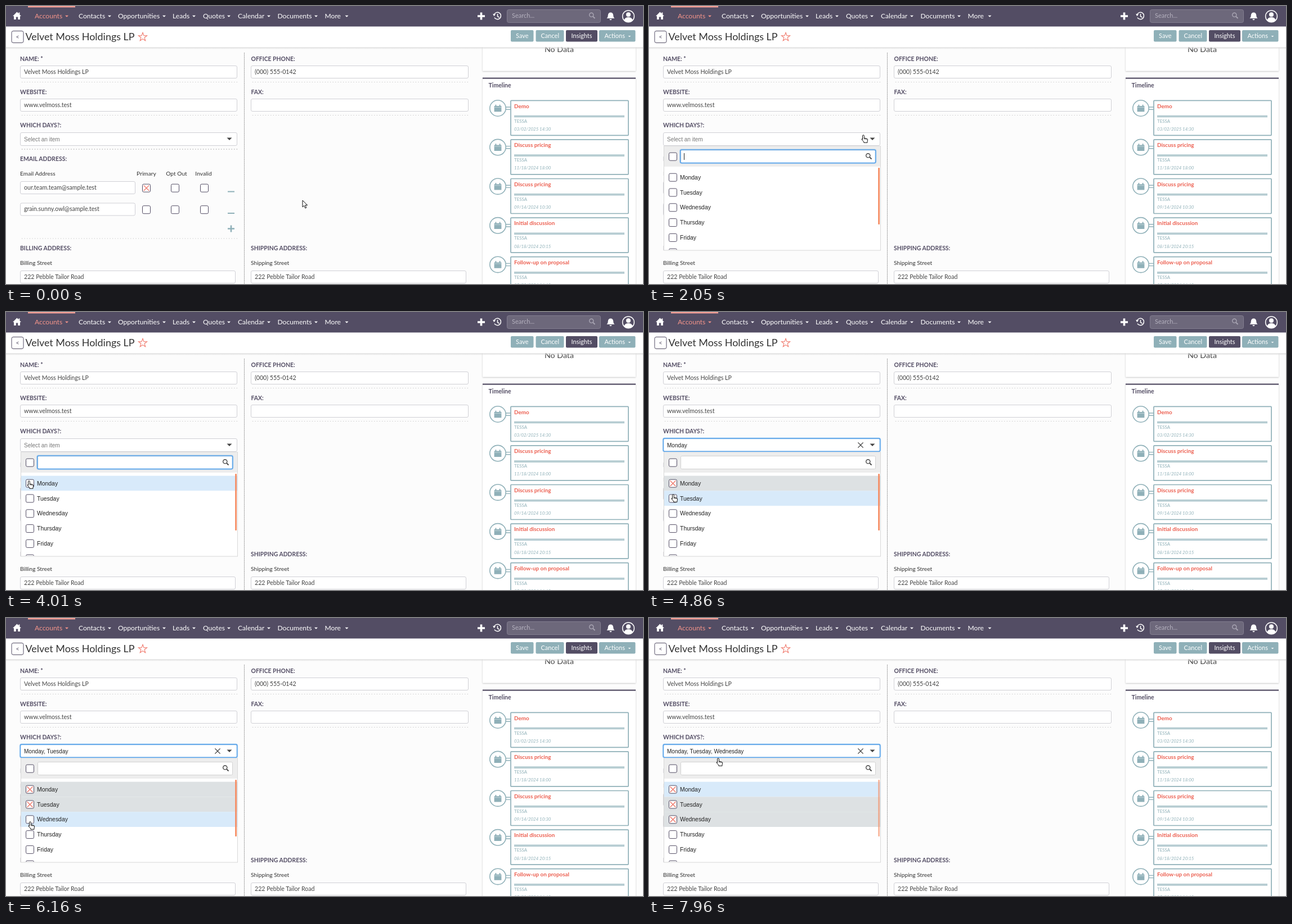
Animation of 1132 by 495 pixels, one loop 7990 ms. Source, as an HTML page:

```html
<!DOCTYPE html>
<html lang="en">
<head>
<meta charset="utf-8">
<title>Account form</title>
<style>
  html, body { margin: 0; width: 100%; height: 100%; overflow: hidden; background: #fcfcfc; }
  svg { display: block; width: 100%; height: 100%; }
  text { font-family: Lato, "Open Sans", sans-serif; white-space: pre; }
  .ui { font-family: "Liberation Sans", Arial, sans-serif; }
</style>
</head>
<body>
<svg id="stage" viewBox="0 0 1132 495" xmlns="http://www.w3.org/2000/svg"></svg>
<script>
const LOOP = 7990;
const PLUM = '#534d64', TEAL = '#8fb0b8', CORAL = '#f0796c', INK = '#444', BLUE = '#4f9fea', EDGE = '#d0d0d5';
const DAYS = ['Monday', 'Tuesday', 'Wednesday', 'Thursday', 'Friday', 'Saturday'];
const ROW_TOP = 291.6, ROW_H = 26.8;

// Markup helpers
const attrs = o => Object.entries(o).map(([k, v]) => ` ${k}="${v}"`).join('');
const text = (x, y, s, size, fill = INK, more = {}) =>
  `<text${attrs({ x, y, 'font-size': size, fill, ...more })}>${s}</text>`;
const rect = (x, y, width, height, fill, more = {}) =>
  `<rect${attrs({ x, y, width, height, fill, ...more })}/>`;
const path = (d, stroke, width = 1, more = {}) =>
  `<path${attrs({ d, fill: 'none', stroke, 'stroke-width': width, ...more })}/>`;
const shape = (d, fill, more = {}) => `<path${attrs({ d, fill, ...more })}/>`;
const circle = (cx, cy, r, fill, more = {}) => `<circle${attrs({ cx, cy, r, fill, ...more })}/>`;
const group = (id, body, more = {}) => `<g${attrs({ id, ...more })}>${body}</g>`;

const BOLD = { 'font-weight': 700 }, MIDDLE = { 'text-anchor': 'middle' };
const label = (x, y, s) => text(x, y, s, 10.4, PLUM, BOLD);
const field = (x, y, w, s = '') =>
  rect(x + .5, y + .5, w - 1, 22, '#fff', { rx: 2.5, stroke: EDGE }) + text(x + 7, y + 14.5, s, 10.6);
const dots = (x, y, color = '#c0c0c0') =>
  path(`M${x} ${y}h384`, color, 1.1, { 'stroke-dasharray': '1.2 3.4' });
const caretDown = (x, y, w, fill) => shape(`M${x - w / 2} ${y}h${w}l${-w / 2} ${w / 2}z`, fill);
const cross = (x, y, r, color, width) =>
  path(`M${x - r} ${y - r}l${2 * r} ${2 * r}m0 ${-2 * r}l${-2 * r} ${2 * r}`, color, width);
const checkbox = (x, y) => rect(x - 6.5, y - 6.8, 14, 14, '#fff', { rx: 2.2, stroke: PLUM });
const focusRing = (x, y, w, h) =>
  rect(x, y, w, h, 'none', { rx: 2.5, stroke: BLUE, 'stroke-opacity': .28, 'stroke-width': 3.2 }) +
  rect(x, y, w, h, 'none', { rx: 2.5, stroke: BLUE, 'stroke-width': 1.3 });
const magnifier = (x, y, color) =>
  circle(x - 1.2, y - 1.2, 3.6, 'none', { stroke: color, 'stroke-width': 1.4 }) +
  path(`M${x + 1.6} ${y + 1.6}l3.4 3.4`, color, 1.9);

function navBar() {
  const items = [['Accounts', 51, 108], ['Contacts', 129, 184], ['Opportunities', 199, 281], ['Leads', 296, 334],
    ['Quotes', 350, 396], ['Calendar', 412, 467], ['Documents', 482.5, 551], ['More', 566.5, 605.5]];
  return rect(0, 0, 1132, 36.5, PLUM) + rect(39, 0, 84, 2.5, '#f4a198') +
    shape('M12 18l7.5-7.5 2.9 2.9v-2h2v4L27 18h-2v6h-3.8v-4.5h-3.4V24H14v-6z', '#fff') +
    items.map(([name, x, arrow], i) => {
      const color = i ? '#fff' : '#f4948a';
      return text(x, 21.6, name, 12.1, color) + caretDown(arrow, 16.8, 6, color);
    }).join('') +
    path('M838 18h13M844.5 11.5v13', '#fff', 3.6) +
    path('M867.4 15.5a6.2 6.2 0 1 1 .6 5.2M873.5 14v4.5l3 1.8', '#fff', 1.5) +
    shape('M865.2 14l5 .6-3 3.6z', '#fff') +
    rect(890.5, 6.5, 166, 23, '#6d687b', { rx: 3, stroke: '#837e90' }) +
    text(899, 21, 'Search...', 11, '#b4b0be') + magnifier(1041.5, 17, '#aaa6b4') +
    shape('M1067.5 22q2.4-2 2.4-6a4.6 4.6 0 0 1 9.2 0q0 4 2.4 6zM1072.5 23.2h4a2 2 0 0 1-4 0z', '#fff') +
    circle(1106, 18.3, 10.4, 'none', { stroke: '#fff', 'stroke-width': 1.5 }) +
    circle(1106, 15.2, 4, '#fff') + shape('M1098.5 25q1.5-5 7.5-5t7.5 5q-3 3-7.5 3t-7.5-3z', '#fff');
}

function titleBar() {
  const star = Array.from({ length: 10 }, (_, i) => {
    const r = i % 2 ? 3.3 : 8, a = i * Math.PI / 5;
    return `${243 + r * Math.sin(a)},${55.3 - r * Math.cos(a)}`;
  }).join(' ');
  const button = (x, w, s, tx, fill = TEAL) =>
    rect(x, 43, w, 20.5, fill, { rx: 2 }) + text(tx, 57, s, 11, '#fff');
  return rect(0, 36.5, 1132, 37, '#fff') + rect(0, 73.5, 1132, 3.5, 'url(#drop)') +
    rect(10, 44.5, 21, 21, '#fff', { rx: 3, stroke: PLUM }) + text(20.5, 58.5, '&lt;', 10.5, PLUM, MIDDLE) +
    text(34.5, 60.5, 'Velvet Moss Holdings LP', 17.9, '#333') +
    `<polygon points="${star}" fill="#fff" stroke="${CORAL}" stroke-width="1.1"/>` +
    button(897, 40.5, 'Save', 906) + button(941.5, 50, 'Cancel', 950.5) +
    button(995, 56, 'Insights', 1004.5, PLUM) + button(1054, 64.5, 'Actions', 1063.5) +
    caretDown(1108, 53, 4.5, '#fff');
}

function form() {
  const emailRow = (y, address) => field(25, y, 205, address) +
    [249, 300, 352].map(x => checkbox(x, y + 12)).join('') + path(`M394 ${y + 18.5}h12`, TEAL, 2);
  const address = (x, kind) => label(x, 435.4, `${kind.toUpperCase()} ADDRESS:`) +
    text(x, 461, `${kind} Street`, 10.25, '#333') + field(x, 471, 383, '222 Pebble Tailor Road');
  return label(25, 97.5, 'NAME: *') + field(25, 106, 386, 'Velvet Moss Holdings LP') +
    label(435.5, 97.5, 'OFFICE PHONE:') + field(435, 106, 387, '(000) 555-0142') +
    label(25, 156.5, 'WEBSITE:') + field(25, 165, 386, 'www.velmoss.test') +
    label(435.5, 156.5, 'FAX:') + field(435, 165, 387) +
    label(25, 215.8, 'WHICH DAYS?:') +
    [[28, 135.5], [438, 135.5], [28, 194.5], [438, 194.5], [28, 414]].map(p => dots(...p)).join('') +
    dots(28, 255, '#858585') +
    path('M423.5 83V495', '#9c9c9c', 1, { 'stroke-dasharray': '2 .7' }) +
    label(25, 276, 'EMAIL ADDRESS:') + text(25, 301.5, 'Email Address', 10.25, '#333') +
    [['Primary', 249.5], ['Opt Out', 303], ['Invalid', 351]]
      .map(([s, x]) => text(x, 301.5, s, 10.25, '#333', MIDDLE)).join('') +
    emailRow(312, 'our.team.team@sample.test') + emailRow(350.5, 'grain.sunny.owl@sample.test') +
    cross(249.5, 324.2, 4.8, CORAL, 1.3) + path('M394 396.5h12m-6-6v12', TEAL, 2.6) +
    address(25, 'Billing') + address(435, 'Shipping');
}

function sidebar() {
  const events = [['Demo', '03/02/2025 14:30'], ['Discuss pricing', '11/18/2024 18:00'],
    ['Discuss pricing', '09/14/2024 10:30'], ['Initial discussion', '08/18/2024 20:15'],
    ['Follow-up on proposal', '07/22/2024 16:45']];
  const event = ([name, date], i) => `<g transform="translate(0 ${i * 69.6})">` +
    circle(874, 182, 14.2, '#fff', { stroke: TEAL, 'stroke-width': 1.6 }) +
    path('M888 180h9m-9 4.2h9', TEAL, 1.4) +
    shape('M867.6 178h1.8v-2.3h2v2.3h5.2v-2.3h2v2.3h1.8v10.3h-12.8z', TEAL) +
    path('M867.6 180.5h12.8', '#d5e2e5', .7) +
    rect(897, 168.3, 209, 62, '#fff', { rx: 1, stroke: TEAL, 'stroke-width': 1.7 }) +
    text(903, 181.6, name, 9.9, '#ec5f50', BOLD) +
    rect(903, 195, 196, 3, '#bed1d6') + path('M903 195.2h196m-196 2.6h196', '#9dbcc3', .7) +
    text(903, 207.6, 'TESSA', 7.9, TEAL) +
    text(903, 221.8, date, 7.9, TEAL, { 'font-style': 'italic' }) + '</g>';
  const card = { filter: 'url(#soft)' };
  return rect(847, 60, 272, 55.5, '#fff', card) + text(983, 82, 'No Data', 14.2, INK, MIDDLE) +
    rect(847, 127.5, 272, 400, '#fff', card) + rect(847, 127.5, 272, 2.2, PLUM) +
    text(857.5, 145.3, 'Timeline', 10.5, PLUM, BOLD) + events.map(event).join('');
}

function select() {
  return rect(25.5, 225.5, 385, 23, '#fff', { rx: 2.5, stroke: EDGE }) +
    group('ring', focusRing(25.3, 225, 385.5, 23.3) + cross(376, 237, 4.6, '#333', 1.2)) +
    caretDown(397, 234.6, 9, INK) + text(32, 240.7, '', 10.05, '#777', { id: 'value', class: 'ui' });
}

function dropdown() {
  const option = (name, i) => {
    const y = ROW_TOP + (i + .5) * ROW_H;
    return rect(27, y - ROW_H / 2, 384, ROW_H, '#fff', { id: 'row' + i }) + checkbox(42, y) +
      group('tick' + i, cross(42.5, y + .2, 5, CORAL, 1.4)) + text(55, y + 3.8, name, 10.45, '#222', { class: 'ui' });
  };
  return group('menu',
    rect(26.5, 249.5, 385, 185.5, '#fff', { stroke: '#d8d8d8' }) + rect(27, 249.5, 384, 36.5, '#ededed') +
    checkbox(42, 268) + rect(56.5, 256.5, 346, 23, '#fff', { rx: 2, stroke: '#d2d2d2' }) +
    group('searchRing', focusRing(55.6, 255.8, 347.2, 23.8)) +
    magnifier(390.5, 267.5, '#444') + rect(62, 262, 1, 12, '#222', { id: 'caret' }) +
    `<g clip-path="url(#list)">${DAYS.map(option).join('')}</g>` +
    rect(407.2, 288, 2.8, 101, '#f68d63', { id: 'bar', rx: 1 }));
}

const OUTLINE = { stroke: '#111', 'stroke-width': 1, 'stroke-linejoin': 'round' };
const stage = document.getElementById('stage');
stage.innerHTML = `<defs>
  <linearGradient id="drop" x2="0" y2="1"><stop stop-color="#dadada"/><stop offset="1" stop-color="#dadada" stop-opacity="0"/></linearGradient>
  <filter id="soft" x="-5%" y="-5%" width="110%" height="115%"><feDropShadow dx="0" dy="1" stdDeviation="1.3" flood-opacity=".25"/></filter>
  <clipPath id="list"><rect x="27" y="286" width="384" height="148"/></clipPath></defs>` +
  rect(0, 0, 1132, 495, '#fcfcfc') + form() + sidebar() + titleBar() + navBar() + select() + dropdown() +
  group('pointer',
    shape('M0 0v12l2.8-2.6 2 4.6 2-.9-2-4.4h3.8z', '#fff', { id: 'arrow', ...OUTLINE }) +
    group('hand',
      shape('M-1.5 7.5V1.2a1.4 1.4 0 0 1 2.8 0V5.2l5 1.1q1.4.4 1.3 1.8l-.6 3.4v1.8h-6.2v-1.4l-3.6-4q-.6-1.2.6-1.4z',
        '#fff', OUTLINE) + path('M1.4 5v2.6m2.1-2.1v2.2m2.1-1.7v2', '#111', .8)));

const el = {};
stage.querySelectorAll('[id]').forEach(node => { el[node.id] = node; });

// Tracks: [time, ...values]
const POINTER = [[530, 527, 346], [760, 508, 314], [930, 470, 287], [1090, 425, 264], [1280, 374, 228],
  [1570, 374, 228], [2050, 381, 230], [2510, 381, 230], [2640, 310, 207], [2800, 190, 195], [2930, 100, 200],
  [3030, 28, 220], [3110, 4, 248], [3210, 16, 286], [3290, 17, 287], [3420, 17, 287], [3600, 30, 297],
  [3850, 41, 301], [4620, 41, 301], [4860, 43, 325], [5020, 43, 332], [5500, 43, 332], [5910, 43, 362],
  [6160, 43, 363], [6600, 43, 363], [6700, 46, 318], [6810, 50, 274], [7000, 46, 266], [7350, 41, 264],
  [7520, 41, 264], [7760, 80, 260], [7960, 123, 250]];
const MENU = [[1570, 0], [1750, 1]];
const BAR = [[2600, 1], [2900, 0], [3540, 0], [3740, 1], [7900, 1], [7960, .65], [7990, .5]];
const CARET = [[0, false], [1770, true], [2515, false], [3262, true], [4010, false]];
const FOCUSED = [[0, -1], [3560, 0], [4790, 1], [5600, 2], [6640, 1], [6700, 0]];
const PICKED = [[0, 0], [4600, 1], [5370, 2], [6210, 3]];

function at(track, t) {
  const next = track.findIndex(k => k[0] > t);
  if (next < 0) return track[track.length - 1].slice(1);
  if (next === 0) return track[0].slice(1);
  const a = track[next - 1], b = track[next], u = (t - a[0]) / (b[0] - a[0]);
  return a.slice(1).map((v, i) => v + (b[i + 1] - v) * u);
}
const step = (track, t) => track.filter(k => k[0] <= t).pop()[1];
const show = (node, on) => node.setAttribute('visibility', on ? 'inherit' : 'hidden');

function draw(t) {
  const [x, y] = at(POINTER, t), [open] = at(MENU, t);
  const picked = step(PICKED, t), focused = step(FOCUSED, t);
  const overSelect = x > 25 && x < 411 && y > 225 && y < 249;
  const overMenu = open > 0 && x > 26 && x < 412 && y >= 249 && y < 435;

  el.pointer.setAttribute('transform', `translate(${x.toFixed(2)} ${y.toFixed(2)})`);
  show(el.hand, overSelect || overMenu);
  show(el.arrow, !(overSelect || overMenu));

  el.menu.setAttribute('opacity', open);
  el.bar.setAttribute('opacity', at(BAR, t)[0]);
  show(el.caret, step(CARET, t));
  show(el.ring, picked > 0);
  show(el.searchRing, picked === 0);
  el.value.textContent = picked ? DAYS.slice(0, picked).join(', ') : 'Select an item';
  el.value.setAttribute('fill', picked ? '#222' : '#777');
  DAYS.forEach((_, i) => {
    el['row' + i].setAttribute('fill', i === focused ? '#d8eafa' : i < picked ? '#dde1e3' : '#fff');
    show(el['tick' + i], i < picked);
  });
}

const start = performance.now();
function tick() {
  draw((performance.now() - start) % LOOP);
  requestAnimationFrame(tick);
}
tick();
</script>
</body>
</html>
```
